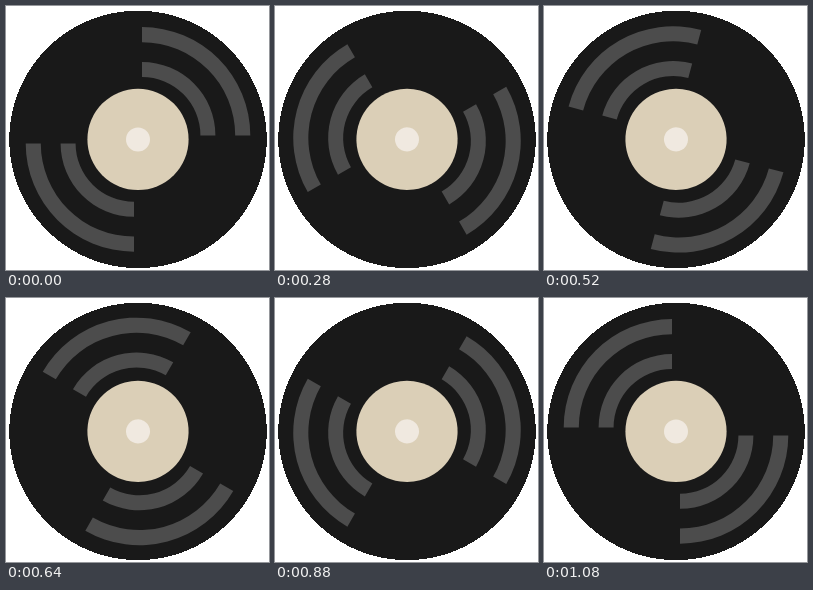
These frames come from a looping animation (263x264 px, 1.16 s). An HTML page with a canvas:

```html
<!DOCTYPE html>
<html lang="en">
<head>
<meta charset="utf-8">
<title>Spinning record</title>
<style>
  html, body { margin: 0; width: 100%; height: 100%; overflow: hidden; background: #fff; }
  canvas { display: block; }
</style>
</head>
<body>
<canvas id="stage" width="263" height="264"></canvas>
<script>
const ctx = document.getElementById('stage').getContext('2d');
const W = 263, H = 264, LOOP = 1160, TICK = 40;
const CX = 132, CY = 133.4, GAP = 4;

// [time in ms, rotation in degrees]
const keys = [[0, 0], [120, 30], [280, 60], [400, 90], [640, 120], [880, 210], [1080, 270], [LOOP, 270]];

function angleAt(t) {
  const i = keys.findIndex(k => k[0] > t);
  const [t0, a0] = keys[i - 1], [t1, a1] = keys[i];
  return a0 + (a1 - a0) * (t - t0) / (t1 - t0);
}

// Disc with a crisp, unsmoothed rim, filled row by row
function vinyl(r, color) {
  ctx.fillStyle = color;
  for (let y = 0; y < H; y++) {
    const dy = y + 0.5 - CY;
    if (Math.abs(dy) >= r) continue;
    const half = Math.sqrt(r * r - dy * dy);
    const left = Math.round(CX - half);
    ctx.fillRect(left, y, Math.round(CX + half) - left, 1);
  }
}

function disc(r, color) {
  ctx.fillStyle = color;
  ctx.beginPath();
  ctx.arc(0, 0, r, 0, Math.PI * 2);
  ctx.fill();
}

// Quarter ring whose own centre is moved outwards along both axes
function groove(inner, outer) {
  ctx.beginPath();
  ctx.arc(GAP, -GAP, outer, -Math.PI / 2, 0);
  ctx.arc(GAP, -GAP, inner, 0, -Math.PI / 2, true);
  ctx.closePath();
  ctx.fill();
}

function draw(now) {
  const t = Math.floor((now % LOOP) / TICK) * TICK;
  ctx.fillStyle = '#fff';
  ctx.fillRect(0, 0, W, H);
  vinyl(128.7, '#191919');
  ctx.save();
  ctx.translate(CX, CY);
  ctx.rotate(angleAt(t) * Math.PI / 180);
  ctx.fillStyle = '#4c4c4c';
  for (let side = 0; side < 2; side++) {
    groove(93.2, 108.3);
    groove(58.4, 73.4);
    ctx.rotate(Math.PI);
  }
  disc(50.6, '#dbcfb7');
  disc(12, '#f0e9e0');
  ctx.restore();
}

const start = performance.now();
function loop() {
  draw(performance.now() - start);
  requestAnimationFrame(loop);
}
loop();
</script>
</body>
</html>
```
